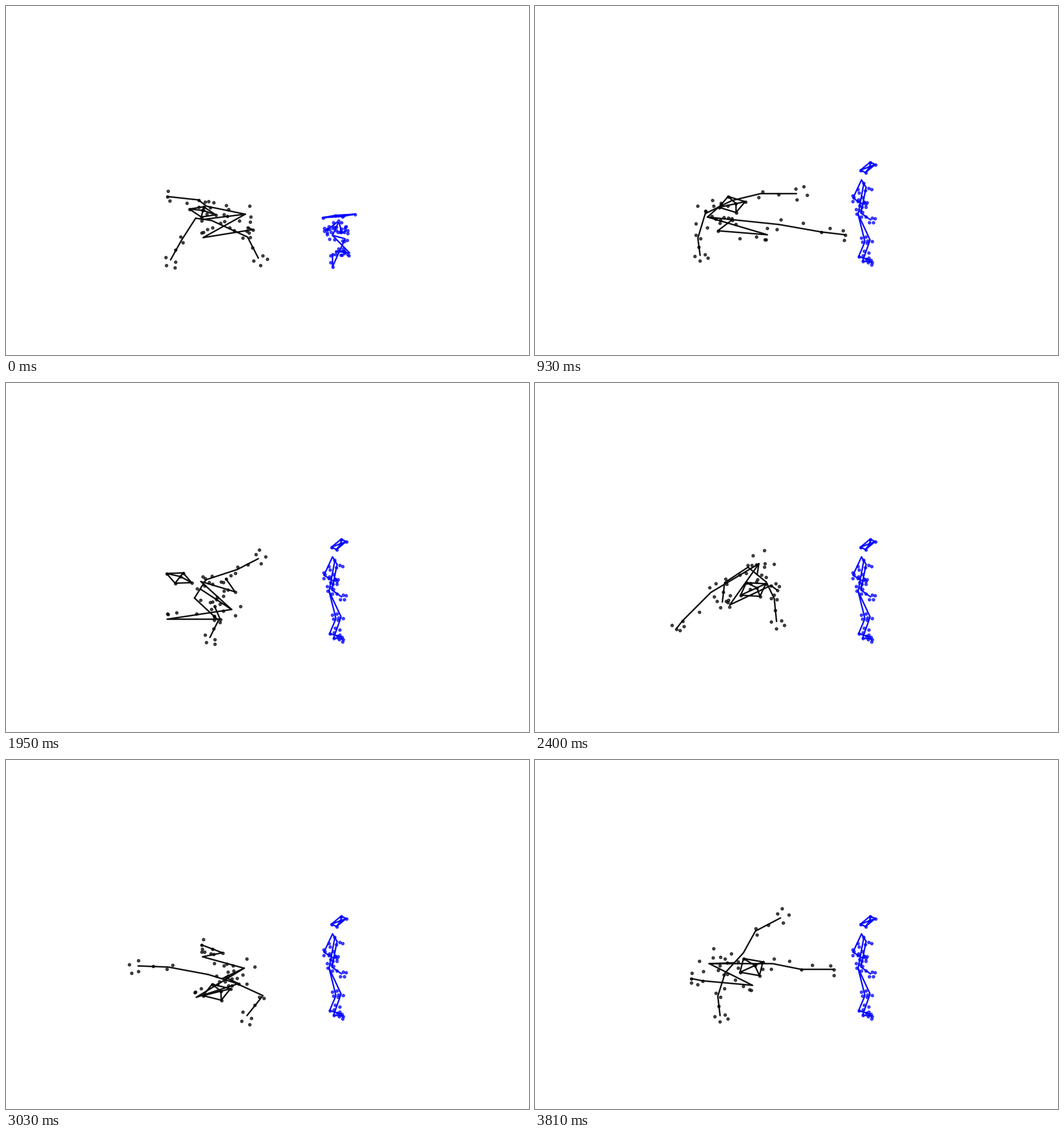
These frames come from a looping animation (917x611 px, 3840 ms). A matplotlib script:

```python
import numpy as np
import matplotlib.pyplot as plt
from matplotlib.animation import FuncAnimation

W, H, DPI = 917, 611, 100
STEP, LOOP = 30, 3840

# Joint order: hip, two arms, two legs (3 joints each), head centre and two half diagonals
HIP, ARM1, ARM2, LEG1, LEG2, HEAD = 0, 1, 4, 7, 10, 13
GOLDEN = np.pi * (3 - 5 ** 0.5)

# Markers on a limb: bone, place along it, pixels to its side
ARM_MARKS = [(1, 1.0, 10), (1, 1.3, 2), (1, 1.2, -13), (1, 0.98, -9),
             (1, 0.5, 1), (1, 0.05, -4), (0, 0.9, 5)]
LEG_MARKS = [(2, 1.0, 10), (2, 0.9, -7), (2, 0.35, -8), (1, 0.55, -10),
             (1, 0.02, -9), (0, 0.98, 9), (0, 0.84, 9)]
TORSO_MARKS = 15


def pose(hip, arm1, arm2, leg1, leg2, head):
    return np.array(hip + arm1 + arm2 + leg1 + leg2 + head, float).reshape(-1, 2)


bridge = pose([419, 364],
              [360, 375, 423, 404, 442, 441], [332, 371, 307, 410, 288, 444],
              [351, 350, 337, 339, 282, 333], [345, 405, 432, 391, 423, 387],
              [344, 360, -23, -5, 2, -9])
kick = pose([302, 369],
            [345, 340, 395, 328, 458, 328], [298, 363, 285, 406, 289, 436],
            [427, 382, 501, 395, 543, 400], [407, 400, 320, 393, 345, 374],
            [345, 347, -7, -14, 23, -5])
reach = pose([314, 345],
             [353, 345, 357, 301, 388, 260], [326, 376, 273, 404, 274, 433],
             [440, 369, 505, 382, 543, 396], [404, 402, 345, 371, 377, 368],
             [373, 381, 7, -16, 21, 4])
tuck = pose([395, 396],
            [350, 344, 405, 326, 442, 307], [330, 376, 372, 415, 357, 445],
            [282, 413, 375, 413, 365, 390], [341, 347, 401, 365, 385, 342],
            [303, 341, -22, -8, 7, -9])
arch = pose([392, 316],
            [373, 322, 332, 349, 328, 383], [405, 348, 419, 377, 423, 417],
            [308, 366, 258, 416, 247, 430], [341, 388, 413, 354, 424, 362],
            [382, 361, -12, -12, 22, -10])
spread = pose([417, 364],
              [354, 375, 284, 362, 231, 360], [402, 390, 450, 412, 422, 447],
              [344, 344, 379, 337, 342, 323], [333, 415, 407, 391, 384, 380],
              [369, 406, -8, -14, 24, -6])
finish = pose([305, 356],
              [365, 337, 386, 299, 430, 276], [333, 372, 320, 413, 324, 447],
              [416, 356, 466, 366, 523, 366], [381, 394, 293, 386, 273, 382],
              [379, 362, -14, -15, 20, -9])

crouch = pose([572, 401],
              [580, 378, 566, 389, 560, 393], [584, 380, 588, 397, 596, 393],
              [602, 432, 578, 429, 592, 428], [594, 407, 572, 456, 572, 434],
              [583, 367, -6, -1, 28, -3])
stand = pose([566, 364],
             [572, 304, 557, 336, 575, 347], [580, 317, 571, 362, 588, 374],
             [578, 412, 567, 438, 585, 444], [587, 409, 574, 446, 590, 448],
             [583, 282, 4, -9, 13, -5])

TIMES = np.array([0, 930, 1380, 1950, 2400, 3030, 3810], float)
KEYS = np.stack([bridge, kick, reach, tuck, arch, spread, finish])
SLOPES = np.gradient(KEYS, TIMES, axis=0) * 0.8
RISE = 510

# Limb sweeps between poses: limb, peak time, half width, dx, dy
SWINGS = [(LEG2, 570, 330, -145, 0), (LEG1, 740, 180, 85, -10),
          (ARM1, 700, 220, 0, -75), (LEG1, 1650, 240, 65, -10),
          (LEG1, 2170, 200, -90, 0), (LEG1, 2610, 200, -85, -30)]


def dancer(t):
    """Cubic path through the key poses plus the limb sweeps."""
    i = min(np.searchsorted(TIMES, t, side="right") - 1, len(TIMES) - 2)
    span = TIMES[i + 1] - TIMES[i]
    u = (t - TIMES[i]) / span
    ease = u * u * (3 - 2 * u)
    joints = (KEYS[i] + ease * (KEYS[i + 1] - KEYS[i])
              + span * u * (1 - u) * ((1 - u) * SLOPES[i] - u * SLOPES[i + 1]))
    for limb, peak, half, dx, dy in SWINGS:
        if abs(t - peak) < half:
            push = np.cos((t - peak) / half * np.pi / 2) ** 2
            joints[limb:limb + 3] += np.outer([0.3, 0.75, 1], [push * dx, push * dy])
    return joints


def partner(t):
    u = min(t / RISE, 1)
    return crouch + (stand - crouch) * u * u * (3 - 2 * u)


def limb_marks(path, marks, scale):
    points = []
    for bone, along, side in marks:
        a, d = path[bone], path[bone + 1] - path[bone]
        normal = np.array([-d[1], d[0]]) / max(np.hypot(*d), 1e-6)
        points.append(a + along * d + scale * side * normal)
    return points


def torso_marks(hip, neck, radius):
    """A spiral of markers wound round the spine."""
    i = np.arange(TORSO_MARKS)[:, None]
    d = neck - hip
    turn = np.arctan2(d[1], d[0]) + i * GOLDEN
    reach = radius * (0.65 + 0.35 * np.cos(i * 1.7))
    return hip + d * i / (TORSO_MARKS - 1) + reach * np.hstack([np.cos(turn), np.sin(turn)])


def build(joints, scale):
    """Return the bone chains and the dots of one body."""
    hip = joints[HIP]
    arms = [joints[k:k + 3] for k in (ARM1, ARM2)]
    legs = [np.vstack([hip, joints[k:k + 3]]) for k in (LEG1, LEG2)]
    neck = (arms[0][0] + arms[1][0]) / 2
    c, p, q = joints[HEAD:]
    head = [c + p, c + q, c - p, c - q]
    face = c + 0.3 * q

    chains = arms + legs + [[arms[0][0], neck, arms[1][0]], [hip, neck],
                            head + head[:1], [head[0], face, head[2]],
                            [head[1], face, head[3]]]
    dots = head + [face] + list(torso_marks(hip, neck, 32 * scale))
    for arm in arms:
        dots += limb_marks(arm, ARM_MARKS, scale)
    for leg in legs:
        dots += [leg[2], leg[3]] + limb_marks(leg, LEG_MARKS, scale)
    return chains, dots


fig = plt.figure(figsize=(W / DPI, H / DPI), dpi=DPI, facecolor="white")
ax = fig.add_axes([0, 0, 1, 1])
ax.set_xlim(-0.5, W - 0.5)
ax.set_ylim(H - 0.5, -0.5)
ax.axis("off")


class Body:
    def __init__(self, color, motion, scale):
        self.motion, self.scale = motion, scale
        self.bones, = ax.plot([], [], color=color, lw=1.9, alpha=0.93, zorder=2,
                              solid_capstyle="round", solid_joinstyle="round")
        self.dots = ax.scatter([], [], s=12, c=color, lw=0.9, alpha=0.72, zorder=1)

    def update(self, t):
        chains, dots = build(self.motion(t), self.scale)
        gap = [[np.nan, np.nan]]
        path = np.vstack([np.vstack([chain, gap]) for chain in chains])
        self.bones.set_data(path[:, 0], path[:, 1])
        self.dots.set_offsets(dots)
        return self.bones, self.dots


bodies = [Body("black", dancer, 1), Body("blue", partner, 0.5)]


def draw(n):
    return [artist for body in bodies for artist in body.update(n * STEP)]


anim = FuncAnimation(fig, draw, frames=LOOP // STEP, interval=STEP,
                     init_func=lambda: draw(0), repeat=True, repeat_delay=0)
plt.show()
```
